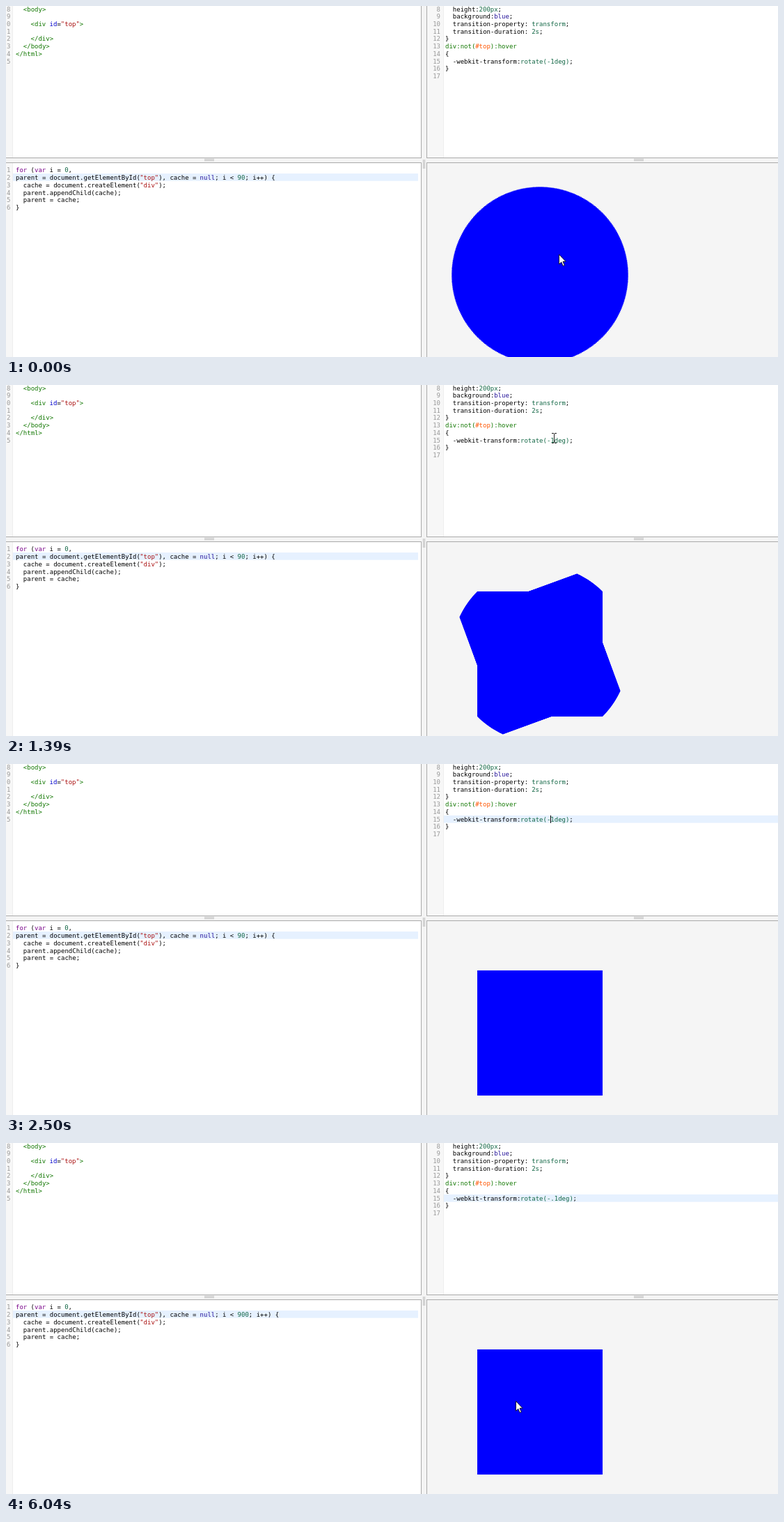
Recreate the animation shown at these times as an HTML page with a canvas. Size 1109x505 px, loop 8000 ms.

```html
<!DOCTYPE html>
<html lang="en">
<head>
<meta charset="utf-8">
<title>Nested rotation</title>
<style>
  html, body { margin: 0; width: 100%; height: 100%; overflow: hidden; background: #f5f5f5; }
  canvas { display: block; }
</style>
</head>
<body>
<canvas id="stage" width="1109" height="505"></canvas>
<script>
const ctx = document.getElementById('stage').getContext('2d');
const LOOP = 8000, CHAR = 5.4, LINE = 10.72;

const COLORS = {
  t: '#117700', a: '#0000cc', s: '#aa1111', k: '#770088',
  n: '#116644', o: '#221199', h: '#ff5500'
};

// Backticks enclose coloured runs; the first letter picks the colour.
const HTML_CODE = [
  '  `t<body>`', '',
  '    `t<div ``aid`=`s"top"``t>`', '',
  '    `t</div>`', '  `t</body>`', '`t</html>`', ''
];
const cssCode = angle => [
  '  height:`n200px`;', '  background:`oblue`;',
  '  transition-property: `ntransform`;', '  transition-duration: `n2s`;', '}',
  '`tdiv:not(``h#top``t):hover`', '{',
  '  -webkit-transform:`nrotate(' + angle + ')`;', '}', ''
];
const jsCode = count => [
  '`kfor` (`kvar` i = `n0`,',
  'parent = document.getElementById(`s"top"`), cache = `onull`; i < `n' + count + '`; i++) {',
  '  cache = document.createElement(`s"div"`);',
  '  parent.appendChild(cache);', '  parent = cache;', '}'
];

// The preview refreshes at these moments while the squares unwind.
const REFRESH = [550, 670, 820, 970, 1120, 1270, 1390, 1540, 1690, 1840, 1960, 2080, 2230, 2350, 2500];

// Pointer: time, shape, x, y
const POINTER = [
  [0, 'arrow', 794, 357], [400, 'arrow', 800, 330], [550, 'arrow', 799, 230],
  [670, 'beam', 796, 134], [820, 'beam', 790, 100], [970, 'beam', 783, 84],
  [1120, 'beam', 787, 76], [1840, 'beam', 783, 77], [2500, 'none'],
  [3400, 'beam', 789, 77], [3520, 'arrow', 660, 119], [3660, 'arrow', 520, 178],
  [3790, 'arrow', 358, 236], [3940, 'arrow', 303, 253], [4090, 'arrow', 318, 253],
  [4210, 'arrow', 329, 253], [4360, 'beam', 343, 248], [4510, 'beam', 344, 248],
  [4790, 'arrow', 342, 247], [5250, 'none'], [5370, 'beam', 351, 237],
  [5640, 'arrow', 500, 285], [5760, 'arrow', 643, 329],
  [5910, 'arrow', 700, 355], [6040, 'arrow', 732, 371]
];

// Text carets: from, to, x, y
const CARETS = [
  [1840, 2230, 338, 241], [1840, 3090, 782, 74], [3240, 3940, 788, 74],
  [4510, 4790, 788, 74], [4790, 5250, 343, 241], [5250, 5910, 348, 241]
];

const box = (color, x, y, w, h) => { ctx.fillStyle = color; ctx.fillRect(x, y, w, h); };

// The standard CSS "ease" curve.
function ease(x) {
  if (x <= 0) return 0;
  if (x >= 1) return 1;
  let lo = 0, hi = 1, s;
  for (let i = 0; i < 24; i++) {
    s = (lo + hi) / 2;
    const r = 1 - s;
    if (0.75 * r * s * (r + s) + s * s * s < x) lo = s; else hi = s;
  }
  const r = 1 - s;
  return 0.3 * r * r * s + 3 * r * s * s + s * s * s;
}

function drawCode(lines, x, y, first, gutterRight, wide) {
  ctx.font = '9px "DejaVu Sans Mono", "Liberation Mono", monospace';
  lines.forEach((line, row) => {
    const base = Math.round(y + row * LINE) + 3;
    const num = first + row;
    ctx.textAlign = 'right';
    ctx.fillStyle = '#999';
    ctx.fillText(wide ? num : num % 10, gutterRight, base);
    ctx.textAlign = 'left';
    let col = 0;
    line.split('`').forEach((part, i) => {
      const run = i % 2 ? part.slice(1) : part;
      ctx.fillStyle = i % 2 ? COLORS[part[0]] : '#000';
      ctx.fillText(run, x + col * CHAR, base);
      col += run.length;
    });
  });
}

function drawPane(x, y, w, h, gutter) {
  box('#aaa', x, y, w, h);
  box('#fff', x + 1, y + 1, w - 2, h - 2);
  box('#f7f7f7', x + 1, y + 1, gutter - x - 1, h - 2);
  box('#eee', gutter, y + 1, 1, h - 2);
}

function drawLayout() {
  box('#f4f4f4', 0, 0, 1109, 505);
  drawPane(-2, -2, 599, 221, 9);
  drawPane(604, -2, 510, 221, 628);
  drawPane(-2, 225, 599, 290, 9);
  box('#aaa', 604, 225, 510, 290);
  box('#f5f5f5', 605, 226, 510, 290);
  for (const d of [0, 2]) {
    box('#bbb', 285, 220 + d, 14, 1);
    box('#bbb', 902, 220 + d, 14, 1);
    box('#bbb', 599 + d, 221, 1, 13);
  }
}

function drawLabel() {
  box('rgba(236,236,236,.85)', 498, 231, 79, 17);
  ctx.font = 'bold 10.3px "Liberation Sans", Arial, sans-serif';
  ctx.fillStyle = '#b3b3b8';
  ctx.fillText('JavaScript', 503, 243.5);
  ctx.fillStyle = ctx.strokeStyle = '#3d9bd8';
  ctx.lineWidth = 2;
  for (const sx of [-1, 1]) for (const sy of [-1, 1]) {
    const px = d => 565 + sx * d, py = d => 240 + sy * d;
    ctx.beginPath();
    ctx.moveTo(px(1.5), py(1.5));
    ctx.lineTo(px(4.5), py(4.5));
    ctx.stroke();
    ctx.beginPath();
    ctx.moveTo(px(6), py(6));
    ctx.lineTo(px(1.5), py(6));
    ctx.lineTo(px(6), py(1.5));
    ctx.fill();
  }
}

function drawSquares(t) {
  const shown = REFRESH.filter(r => r <= t).pop() || 0;
  const step = 1 - ease((shown - 500) / 1880);
  ctx.save();
  ctx.translate(767, 387);
  for (let k = 0; k <= 90; k++) {
    box('#00f', -90, -90, 180, 180);
    ctx.rotate(-step * Math.PI / 180);
  }
  ctx.restore();
}

function drawPointer(t) {
  const [, kind, x, y] = POINTER.filter(p => p[0] <= t).pop();
  if (kind === 'arrow') {
    const arrow = new Path2D('M.5 .5V14.5L3.8 11.5L6.2 17L8.3 16L6 10.7H10.2Z');
    ctx.save();
    ctx.translate(x, y);
    ctx.fillStyle = '#fff';
    ctx.strokeStyle = '#1c1c2c';
    ctx.lineWidth = 1;
    ctx.fill(arrow);
    ctx.stroke(arrow);
    ctx.restore();
  } else if (kind === 'beam') {
    box('#222', x, y - 6, 1, 13);
    for (const dy of [-7, 7]) {
      box('#222', x - 3, y + dy, 3, 1);
      box('#222', x + 1, y + dy, 3, 1);
    }
  }
}

function draw(t) {
  drawLayout();
  box('#e6f1ff', 10, 241, 582, 10.7);
  if (t >= 1840) box('#e6f1ff', 629, 74, 480, 10.7);
  drawCode(HTML_CODE, 14, 4.6, 8, 6.5, false);
  drawCode(cssCode(t < 3240 ? '-1deg' : '-.1deg'), 631, 4.6, 8, 624, true);
  drawCode(jsCode(t < 5250 ? 90 : 900), 14, 236.4, 1, 6.5, false);
  for (const [from, to, x, y] of CARETS) {
    if (t >= from && t < to) box('#000', x, y, 1, 11);
  }
  if (t >= 3790 && t < 5760) drawLabel();
  drawSquares(t);
  drawPointer(t);
}

const start = performance.now();
function tick() {
  draw((performance.now() - start) % LOOP);
  requestAnimationFrame(tick);
}
tick();
</script>
</body>
</html>
```
